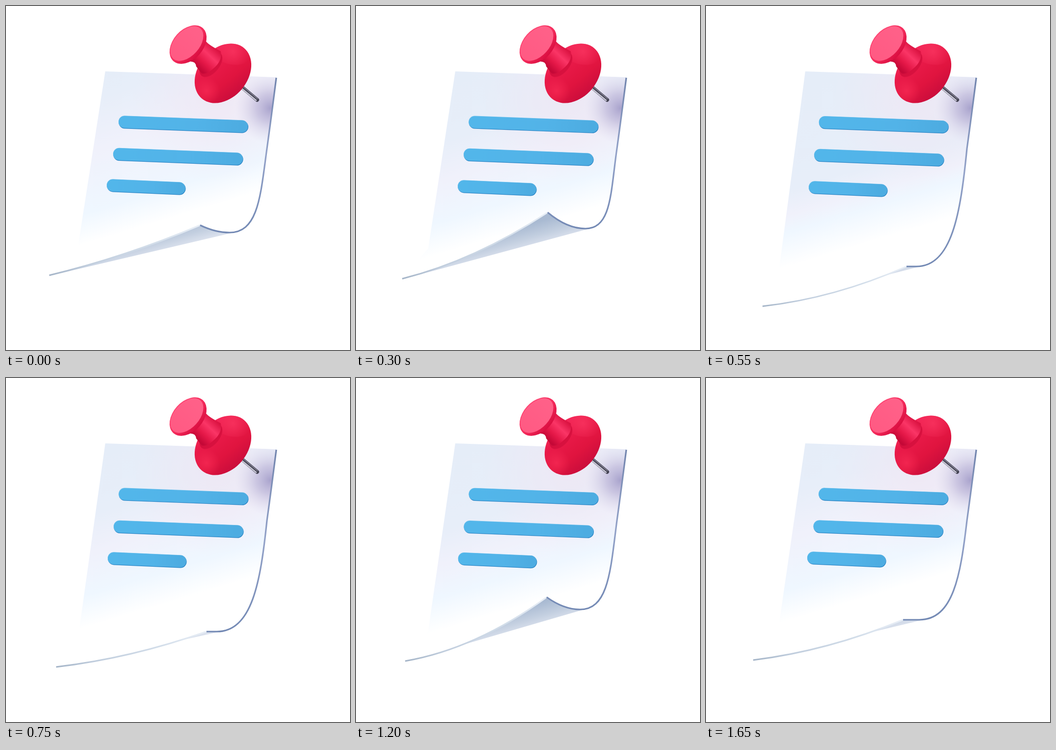
Recreate the animation shown at these times as an HTML page with a canvas. Size 700 by 700 pixels, loop 1.7 s.

```html
<!DOCTYPE html>
<html lang="en">
<head>
<meta charset="utf-8">
<title>Pinned note</title>
<style>
html, body { margin: 0; background: #fff; overflow: hidden; }
canvas { display: block; }
</style>
</head>
<body>
<canvas id="stage" width="700" height="700"></canvas>
<script>
const ctx = document.getElementById('stage').getContext('2d');
const PERIOD = 850, STEP = 50;

// time, tip x/y, fold corner x/y, curl bottom x/y, edge sag, flatness
const POSES = [
  [0, 88, 548, 395, 446, 455, 461, 7, 0],
  [75, 84, 527, 398, 413, 461, 442, 5, -.1],
  [150, 87, 528, 396, 406, 466, 437, 7, 0],
  [225, 88, 537, 393, 406, 469, 440, 11, .25],
  [300, 94, 555, 390, 420, 467, 453, 15, .5],
  [350, 100, 576, 388, 446, 456, 471, 20, .68],
  [450, 110, 602, 396, 498, 436, 508, 17, .9],
  [550, 115, 611, 408, 530, 428, 530, 12, 1],
  [625, 114, 615, 412, 537, 430, 537, 9, .88],
  [750, 102, 588, 408, 516, 429, 516, 9, .5],
  [800, 96, 574, 401, 492, 434, 492, 11, .25]
];

function poseRow(i) {
  const n = POSES.length, turn = Math.floor(i / n);
  const [time, ...values] = POSES[i - turn * n];
  return [time + turn * PERIOD, ...values];
}

// Periodic cubic through the poses.
function poseAt(time) {
  let i = POSES.length - 1;
  while (POSES[i][0] > time) i--;
  const [a, b, c, d] = [-1, 0, 1, 2].map(k => poseRow(i + k));
  const span = c[0] - b[0], u = (time - b[0]) / span;
  return b.slice(1).map((from, j) => {
    const k = j + 1, to = c[k];
    const m0 = (to - a[k]) / (c[0] - a[0]) * span;
    const m1 = (d[k] - from) / (d[0] - b[0]) * span;
    const diff = to - from;
    return from + u * (m0 + u * (3 * diff - 2 * m0 - m1 + u * (m0 + m1 - 2 * diff)));
  });
}

function withStops(gradient, stops) {
  stops.forEach(([at, color]) => gradient.addColorStop(at, color));
  return gradient;
}
const linear = (x0, y0, x1, y1, ...stops) =>
  withStops(ctx.createLinearGradient(x0, y0, x1, y1), stops);
const radial = (x, y, r, ...stops) =>
  withStops(ctx.createRadialGradient(x, y, 0, x, y, r), stops);

function fill(path, style) {
  ctx.fillStyle = style;
  ctx.fill(path);
}
function stroke(path, style, width, cap = 'butt') {
  ctx.strokeStyle = style;
  ctx.lineWidth = width;
  ctx.lineCap = cap;
  ctx.stroke(path);
}
function ellipse(x, y, rx, ry, degrees) {
  const path = new Path2D();
  path.ellipse(x, y, rx, ry, degrees * Math.PI / 180, 0, Math.PI * 2);
  return path;
}

function drawPaper([tx, ty, cx, cy, bx, by, sag, flat]) {
  const midX = (tx + cx) / 2, midY = (ty + cy) / 2 + 2 * sag;
  const curl = `C518 ${290 + .55 * (by - 290)} ${514 + .5 * (bx - 455)} ${by} ${bx} ${by}
    Q${(bx + cx) / 2 + 1} ${by} ${cx} ${cy}`;
  const rightEdge = `M550 146Q540 225 531 290${curl}`;
  const lowerEdge = `Q${midX} ${midY} ${tx} ${ty}`;
  const front = new Path2D(`M202 133L550 145Q540 225 531 290${curl}${lowerEdge}L147 ${ty - 62}Z`);

  const back = new Path2D(`M${tx} ${ty + 1}L${bx + 8} ${by}L${cx} ${cy}${lowerEdge}Z`);
  const lineX = (bx + tx) / 2, lineY = (by + ty) / 2;
  fill(back, linear(lineX + 18, lineY - 45, lineX + 34, lineY + 12,
    [0, '#a9bad2'], [.45, '#c3cfe0'], [1, '#eaedf6']));

  const reach = 328 + 46 * flat;
  fill(front, linear(200, 130, 200 + .287 * reach, 130 + .958 * reach,
    [0, '#e5edf8'], [.15 + .45 * flat, '#e7eef9'], [.45 + .28 * flat, '#f0f1fb'],
    [.82, '#eff7ff'], [1, '#fff']));
  ctx.save();
  ctx.clip(front);
  fill(front, radial(430, 190, 170, [0, 'rgba(240,230,243,.75)'], [1, 'rgba(240,230,243,0)']));
  fill(front, radial(538, 208, 72,
    [0, 'rgba(157,150,197,.85)'], [.4, 'rgba(185,178,214,.65)'], [1, 'rgba(220,215,235,0)']));
  ctx.restore();

  const tipEdge = new Path2D(`M${cx} ${cy}${lowerEdge}`);
  stroke(tipEdge, linear(tx, ty, cx, cy, [0, '#a5b5c8'], [.25, '#c0cddd'], [.7, '#d3deea'], [1, '#e8eef6']), 3);
  const edge = new Path2D(rightEdge);
  stroke(edge, linear(0, 146, 0, by, [0, '#7285ae'], [.5, '#93a2c8'], [1, '#7389b4']), 3.2);
}

function drawBar(x0, y0, x1, y1, shift, flat) {
  const dx = shift * flat, dy = shift * flat;
  const line = offset => new Path2D(
    `M${x0 + dx + offset * .6} ${y0 + dy + offset}L${x1 + dx + offset * .6} ${y1 + dy + offset}`);
  stroke(line(.8), '#2c86c6', 25.4, 'round');
  stroke(line(-.5), '#7cc6ee', 24.6, 'round');
  stroke(line(0), linear(x0, 0, x1, 0, [0, '#52b6ea'], [.6, '#52b3e8'], [1, '#4dace1']), 24.4, 'round');
}

function drawPin() {
  const needle = new Path2D('M474 160L511 191');
  stroke(needle, '#454454', 8, 'round');
  stroke(new Path2D('M475 164L509 192'), '#c9c8d6', 2.6, 'round');
  stroke(new Path2D('M480 162L512 189'), '#8d8b9c', 1.5);

  fill(ellipse(441.5, 137, 67, 50, -50), linear(405, 95, 474, 183,
    [0, '#f5285a'], [.3, '#e91a49'], [.65, '#e0143f'], [1, '#c80c3b']));
  ctx.save();
  ctx.clip(ellipse(441.5, 137, 67, 50, -50));
  fill(ellipse(460, 95, 42, 24, 10), radial(462, 93, 36,
    [0, 'rgba(255,62,104,.6)'], [1, 'rgba(255,62,104,0)']));
  fill(ellipse(408, 173, 34, 28, 0), radial(408, 173, 28,
    [0, 'rgba(255,50,92,.55)'], [1, 'rgba(255,50,92,0)']));
  ctx.restore();

  fill(ellipse(417, 119, 30, 17, -50), linear(400, 110, 432, 136, [0, '#d30d3d'], [1, '#d9123f']));
  const neck = new Path2D('M407 72Q412 79 437 92Q441 112 421 128Q409 140 398 137L387 123Q386 112 374 113Z');
  fill(neck, linear(382, 117, 418, 79,
    [0, '#c50837'], [.3, '#e51848'], [.65, '#fa3566'], [1, '#dc1443']));

  fill(ellipse(370.5, 78.5, 45, 30.5, -48), linear(345, 55, 393, 100,
    [0, '#ff4775'], [.55, '#f52b5c'], [1, '#d90d40']));
  fill(ellipse(368, 76.5, 41.5, 25.5, -48), linear(340, 105, 395, 45,
    [0, '#ff5a83'], [1, '#ff6189']));
}

function draw(now) {
  const pose = poseAt(Math.floor(now / STEP) * STEP % PERIOD);
  const flat = pose[7];
  ctx.clearRect(0, 0, 700, 700);
  drawPaper(pose);
  drawBar(241.5, 236, 480, 245, .7, flat);
  drawBar(230.5, 301.5, 469.5, 311, 2, flat);
  drawBar(217.5, 365, 352.5, 371, 4, flat);
  drawPin();
}

const start = performance.now();
function tick() {
  draw(performance.now() - start);
  requestAnimationFrame(tick);
}
tick();
</script>
</body>
</html>
```
